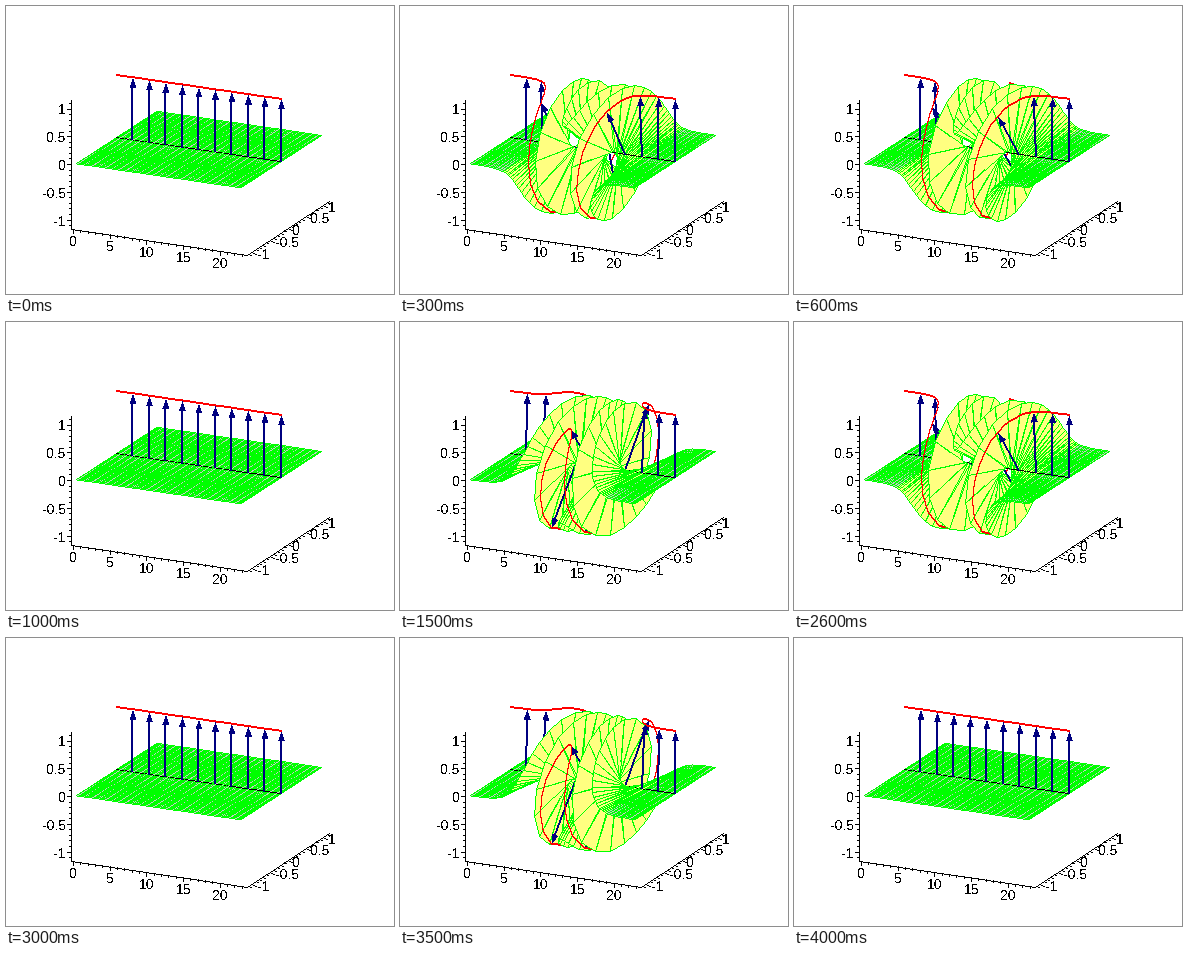
Recreate the animation shown at these times as a matplotlib script. Size 388 by 288 pixels, loop 4100 ms.

```python
import math

import matplotlib.pyplot as plt
import numpy as np
from matplotlib.animation import FuncAnimation

W, H, DPI = 388, 288, 100
FRAMES, STEP_MS, HALF_PERIOD = 41, 100, 10

LENGTH, RADIUS = 22.5, 1.12      # chain length, arrow length
STEPS, ARROWS = 100, 10
OMEGA = 0.15
KAPPA = math.sqrt(1 - OMEGA ** 2)
CALM = 0.05                      # twist below which the strip looks grey

GREEN, YELLOW, GREY = (0, 255, 0), (255, 255, 128), (200, 200, 200)
RED, NAVY, BLACK = (255, 0, 0), (0, 0, 128), (0, 0, 0)

# Columns: screen x, screen y, nearness to the viewer.
ORIGIN = np.array([110.5, 131.5, 0])
BASIS = np.array([[7.33, 1.07, 0.387 / 23.7],
                  [35.6, -23.5, -0.822 / 2.34],
                  [0, -55.5, 0.418 / 2.34]])

plt.rcParams["text.hinting"] = "native"
fig = plt.figure(figsize=(W / DPI, H / DPI), dpi=DPI, facecolor="white")
ax = fig.add_axes([0, 0, 1, 1])
ax.axis("off")


def project(p):
    return ORIGIN + np.asarray(p) @ BASIS


def angle(x, n):
    """Breather solution of the sine-Gordon equation."""
    swing = KAPPA / OMEGA * math.sin(math.pi * n / HALF_PERIOD)
    return 4 * np.arctan(swing / np.cosh(KAPPA * (x - LENGTH / 2)))


class Canvas:
    """Hard-edged drawing with a depth buffer."""

    def __init__(self, base=None):
        self.rgb = np.full((H, W, 3), 255, np.uint8) if base is None else base.copy()
        self.near = np.full((H, W), -9.0)

    def put(self, x, y, near, color):
        seen = near >= self.near[y, x]
        x, y = x[seen], y[seen]
        self.rgb[y, x] = color
        self.near[y, x] = near[seen]

    def line(self, a, b, color, bias=0.0, brush=((0, 0),)):
        ends = np.floor([a[:2], b[:2]])
        count = int(np.abs(ends[1] - ends[0]).max())
        t = np.linspace(0, 1, count + 1)
        xy = ends[0] + t[:, None] * (ends[1] - ends[0])
        x, y = np.floor(xy + 0.5).astype(int).T
        near = a[2] + t * (b[2] - a[2]) + bias
        for dx, dy in brush:
            self.put(x + dx, y + dy, near, color)

    def triangle(self, a, b, c, color):
        area = (b[0] - a[0]) * (c[1] - a[1]) - (b[1] - a[1]) * (c[0] - a[0])
        if abs(area) < 1e-6:
            return
        xs, ys = zip(a[:2], b[:2], c[:2])
        y, x = np.mgrid[int(min(ys)):int(max(ys)) + 1,
                        int(min(xs)):int(max(xs)) + 1]
        px, py = x + 0.5 - a[0], y + 0.5 - a[1]
        u = (px * (c[1] - a[1]) - py * (c[0] - a[0])) / area
        v = (py * (b[0] - a[0]) - px * (b[1] - a[1])) / area
        inside = (u >= 0) & (v >= 0) & (u + v <= 1)
        near = a[2] + u * (b[2] - a[2]) + v * (c[2] - a[2])
        self.put(x[inside], y[inside], near[inside], color)


def draw_strip(canvas, x, phi):
    s = np.array([-RADIUS, 0, RADIUS])
    grid = project(np.stack([np.repeat(x[:, None], 3, 1),
                             np.cos(phi)[:, None] * s,
                             np.sin(phi)[:, None] * s], axis=-1))
    cells = [(i, j) for i in range(STEPS) for j in range(2)]
    for i, j in cells:
        color = YELLOW if abs(phi[i]) > CALM else GREY
        a, b = grid[i, j], grid[i, j + 1]
        c, d = grid[i + 1, j + 1], grid[i + 1, j]
        canvas.triangle(a, b, c, color)
        canvas.triangle(a, c, d, color)
    for i, j in cells:
        a, b = grid[i, j], grid[i, j + 1]
        c, d = grid[i + 1, j + 1], grid[i + 1, j]
        for p, q in ((a, b), (a, c), (a, d), (b, c), (c, d)):
            canvas.line(p, q, GREEN, 0.015)


def draw_arrow(canvas, base, tip):
    along = (tip - base) / np.linalg.norm((tip - base)[:2])
    across = np.array([-along[1], along[0], 0])
    neck = tip - 10 * along
    canvas.line(base, neck, NAVY, 0.02, ((0, 0), (-1, 0)))
    canvas.triangle(tip, neck + 3.5 * across, neck - 3.5 * across, NAVY)


def build(n):
    x = np.linspace(0, LENGTH, STEPS + 1)
    phi = angle(x, n)
    zero = np.zeros_like(x)
    axis = project(np.stack([x, zero, zero], axis=-1))
    tips = project(np.stack([x, -RADIUS * np.sin(phi),
                             RADIUS * np.cos(phi)], axis=-1))
    canvas = Canvas(backdrop.rgb)
    draw_strip(canvas, x, phi)
    for i in range(STEPS):
        canvas.line(axis[i], axis[i + 1], BLACK, 0.015)
    for i in range(STEPS // ARROWS, STEPS + 1, STEPS // ARROWS):
        draw_arrow(canvas, axis[i], tips[i])
    for i in range(STEPS):
        canvas.line(tips[i], tips[i + 1], RED, 0.02, ((0, 0), (0, -1)))
    return canvas.rgb


def stroke(x0, y0, x1, y1):
    backdrop.line((x0, y0, 0), (x1, y1, 0), BLACK)


def label(x, y, text, ha):
    ax.text(x, y, text, ha=ha, va="center_baseline", color="black",
            family="Liberation Sans", size=14 * 72 / DPI, antialiased=False)


def draw_axes():
    stroke(65, 94, 65, 223)
    stroke(65, 223, 241, 249)
    stroke(241, 249, 323, 195)
    for k in range(-11, 12):
        major = k % 5 == 0
        size = 4 if major else 2
        z = 158.5 - 5.55 * k
        stroke(65 - size, z, 65, z)
        yx, yy = 282.3 + 3.56 * k, 222.6 - 2.35 * k
        stroke(yx, yy, yx + size, yy + size / 2)
        if major:
            text = f"{k / 10:g}"
            label(60, z + 0.5, text, "right")
            label(yx + 4.5, yy + 1.5, text, "left")
    for k in range(24):
        tx = 67.5 + 7.33 * k
        ty = 223 + (tx - 65) * 26 / 176
        stroke(tx, ty, tx, ty + (4 if k % 5 == 0 else 2))
        if k % 5 == 0:
            label(tx, ty + 11.5, str(k), "center")


backdrop = Canvas()
draw_axes()
picture = ax.imshow(backdrop.rgb, extent=(0, W, H, 0), aspect="auto",
                    interpolation="nearest")


def update(n):
    picture.set_data(build(n))
    return [picture]


anim = FuncAnimation(fig, update, frames=FRAMES, interval=STEP_MS,
                     repeat=True, repeat_delay=0, blit=False)
plt.show()
```
